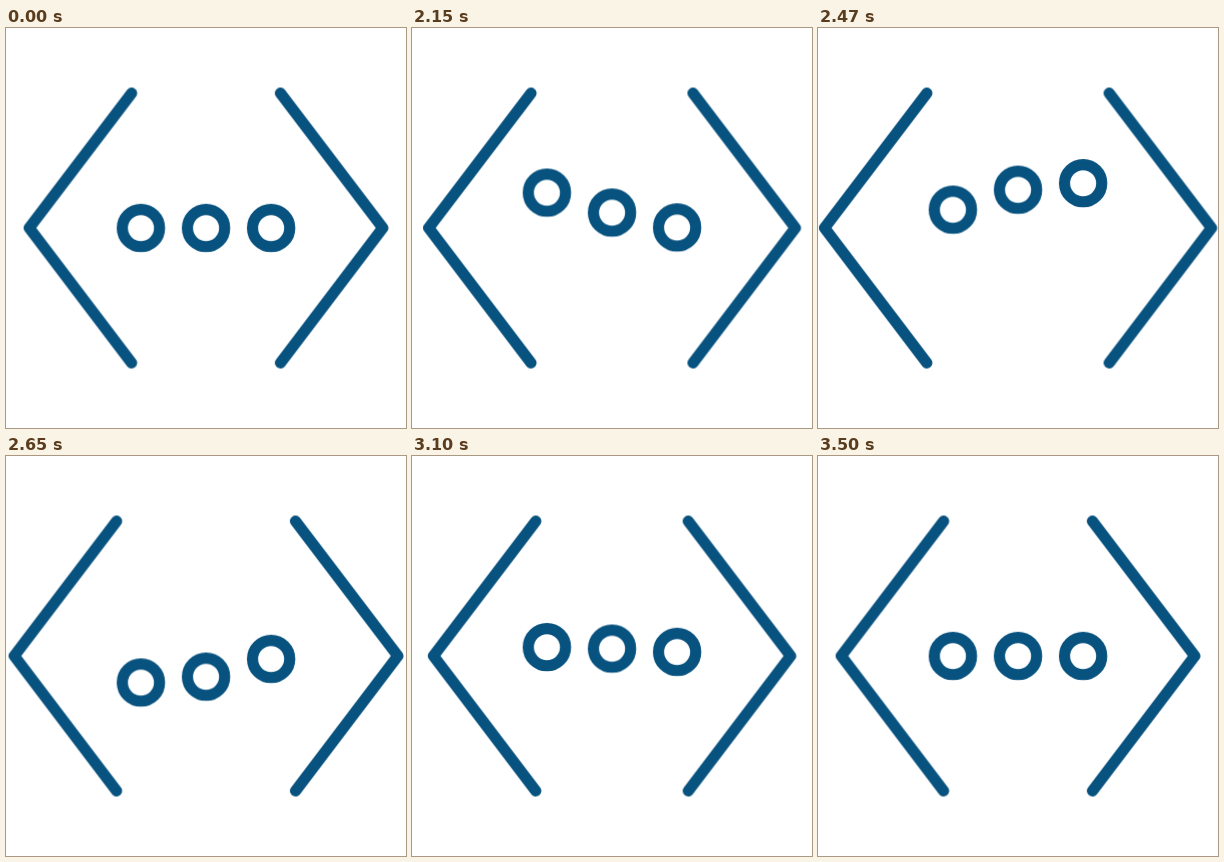
These frames come from a looping animation (400x400 px, 3.52 s). An HTML page:

```html
<!DOCTYPE html>
<html lang="en">
<head>
<meta charset="utf-8">
<title>Code brackets</title>
<style>
  html, body { margin: 0; width: 100%; height: 100%; overflow: hidden; background: #fff; }
  svg { display: block; width: 100%; height: 100%; }
  g { fill: none; stroke: #08527f; stroke-width: 12; stroke-linecap: round; stroke-linejoin: round; }
</style>
</head>
<body>
<svg viewBox="0 0 430 430">
  <g>
    <path id="left" d="M135 70 25 215 135 360"/>
    <path id="right" d="M295 70 405 215 295 360"/>
    <circle class="dot" cx="145" cy="215" r="20"/>
    <circle class="dot" cx="215" cy="215" r="20"/>
    <circle class="dot" cx="285" cy="215" r="20"/>
  </g>
</svg>
<script>
  const LOOP = 3520, REST = 2000, STEP = 25;
  const MOVE = 1500, DOT_DELAY = 67, DOT_MOVE = MOVE - 2 * DOT_DELAY;

  const ease = (x1, x2) => `cubic-bezier(${x1}, 0, ${x2}, 1)`;
  const key = (x, y, time, length, easing = "linear") =>
    ({ transform: `translate(${x}px, ${y}px)`, offset: time / length, easing });

  // Paused animations, driven by the clock below
  const moves = [];
  function move(element, keys, duration, delay = 0) {
    const animation = element.animate(keys, { duration, delay, fill: "both" });
    animation.pause();
    moves.push(animation);
  }

  const spread = x => [
    key(0, 0, 0, MOVE, ease(0.33, 0.33)),
    key(x, 0, 467, MOVE, ease(0.4, 0.18)),
    key(0, 0, MOVE, MOVE)
  ];
  move(document.getElementById("left"), spread(-18), MOVE);
  move(document.getElementById("right"), spread(18), MOVE);

  // A leap up, a dip below the line, a small rebound
  const bounce = [
    key(0, 0, 0, DOT_MOVE, ease(0.33, 0.4)),
    key(0, -50, 267, DOT_MOVE, ease(0.7, 0.3)),
    key(0, 30, 717, DOT_MOVE, ease(0.36, 0.14)),
    key(0, -10, 1170, DOT_MOVE, ease(0.33, 0.67)),
    key(0, 0, DOT_MOVE, DOT_MOVE)
  ];
  document.querySelectorAll(".dot").forEach((dot, i) =>
    move(dot, bounce, DOT_MOVE, i * DOT_DELAY));

  const start = performance.now();
  function draw() {
    const t = (performance.now() - start) % LOOP;
    const step = Math.max(0, Math.floor((t - REST + 5) / STEP));
    for (const animation of moves) animation.currentTime = step * STEP;
    requestAnimationFrame(draw);
  }
  draw();
</script>
</body>
</html>
```
